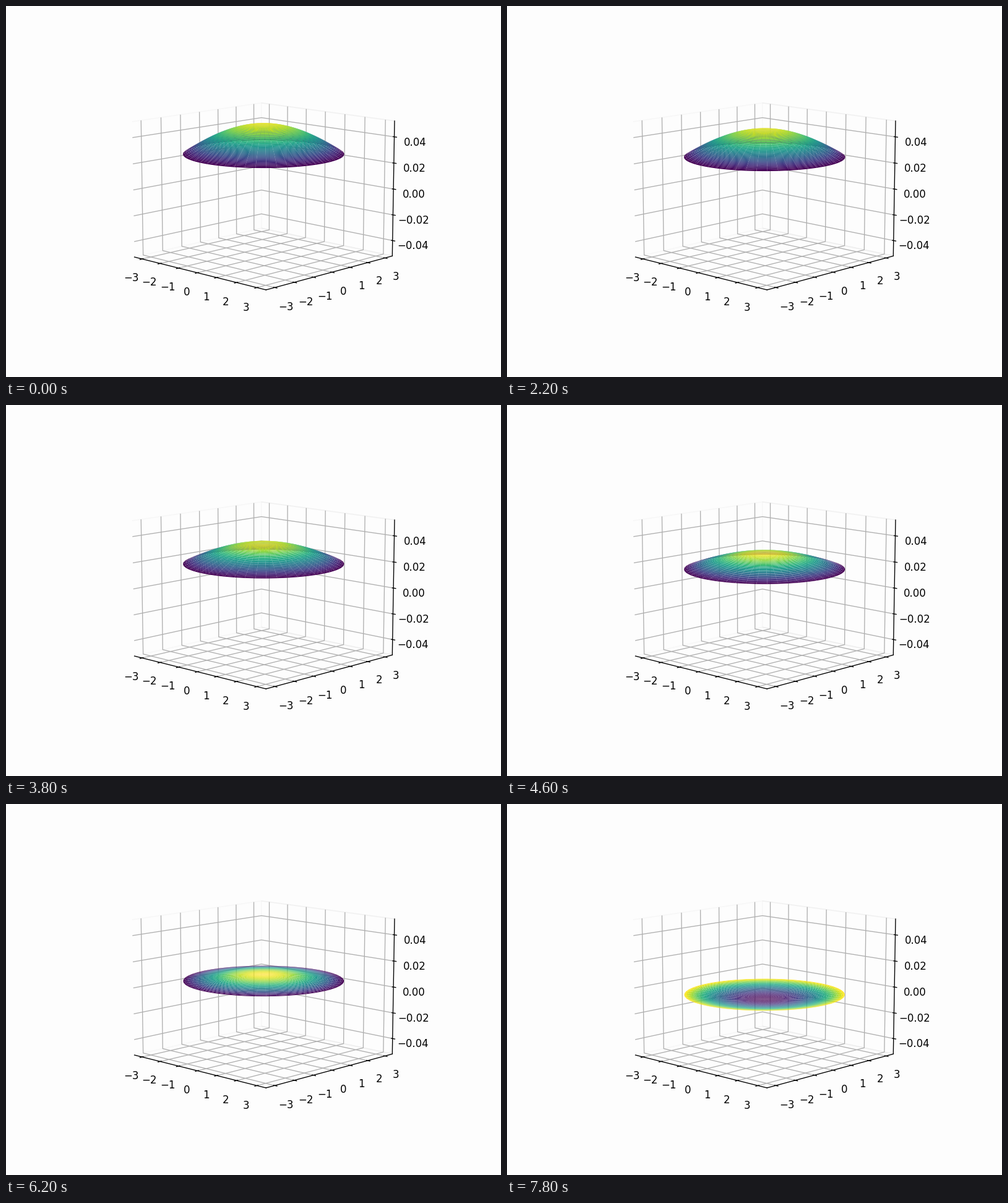
A matplotlib script for the animation above (8 s loop, 800 px wide and 600 px high).

```python
import numpy as np
import matplotlib.pyplot as plt
from matplotlib.animation import FuncAnimation

DPI = 120
FRAMES, STEP_MS = 40, 200
RADIUS = 3.0
HEIGHT = 0.0502          # peak displacement at the centre
WAVENUMBER = 0.475
OMEGA, PHASE = 0.238, -0.106
PAPER = "#fdfdfd"


def bessel0(x):
    """J0 by averaging its integral form."""
    theta = (np.arange(64) + 0.5) * np.pi / 64
    return np.cos(x[..., None] * np.sin(theta)).mean(axis=-1)


r, phi = np.meshgrid(np.linspace(0, RADIUS, 50), np.linspace(0, 2 * np.pi, 50))
X, Y = r * np.cos(phi), r * np.sin(phi)
SHAPE = HEIGHT * bessel0(WAVENUMBER * r)

fig = plt.figure(figsize=(800 / DPI, 600 / DPI), dpi=DPI, facecolor=PAPER)
ax = fig.add_subplot(projection="3d", facecolor=PAPER)
ax.view_init(elev=11.25, azim=-46)

side = RADIUS * 1.1 * 25 / 24
top = 0.05 * 25 / 24
ax.set_xlim(-side, side)
ax.set_ylim(-side, side)
ax.set_zlim(-top, top)
ax.set_xticks(range(-3, 4))
ax.set_yticks(range(-3, 4))
for axis in (ax.xaxis, ax.yaxis, ax.zaxis):
    axis.pane.set_fill(False)

surfaces = []


def draw(frame):
    while surfaces:
        surfaces.pop().remove()
    t = frame * STEP_MS / 1000
    z = SHAPE * np.cos(OMEGA * t + PHASE)
    surfaces.append(ax.plot_surface(X, Y, z, cmap="viridis"))
    return surfaces


anim = FuncAnimation(fig, draw, frames=FRAMES, init_func=lambda: draw(0),
                     interval=STEP_MS, repeat=True, repeat_delay=0)
plt.show()
```
